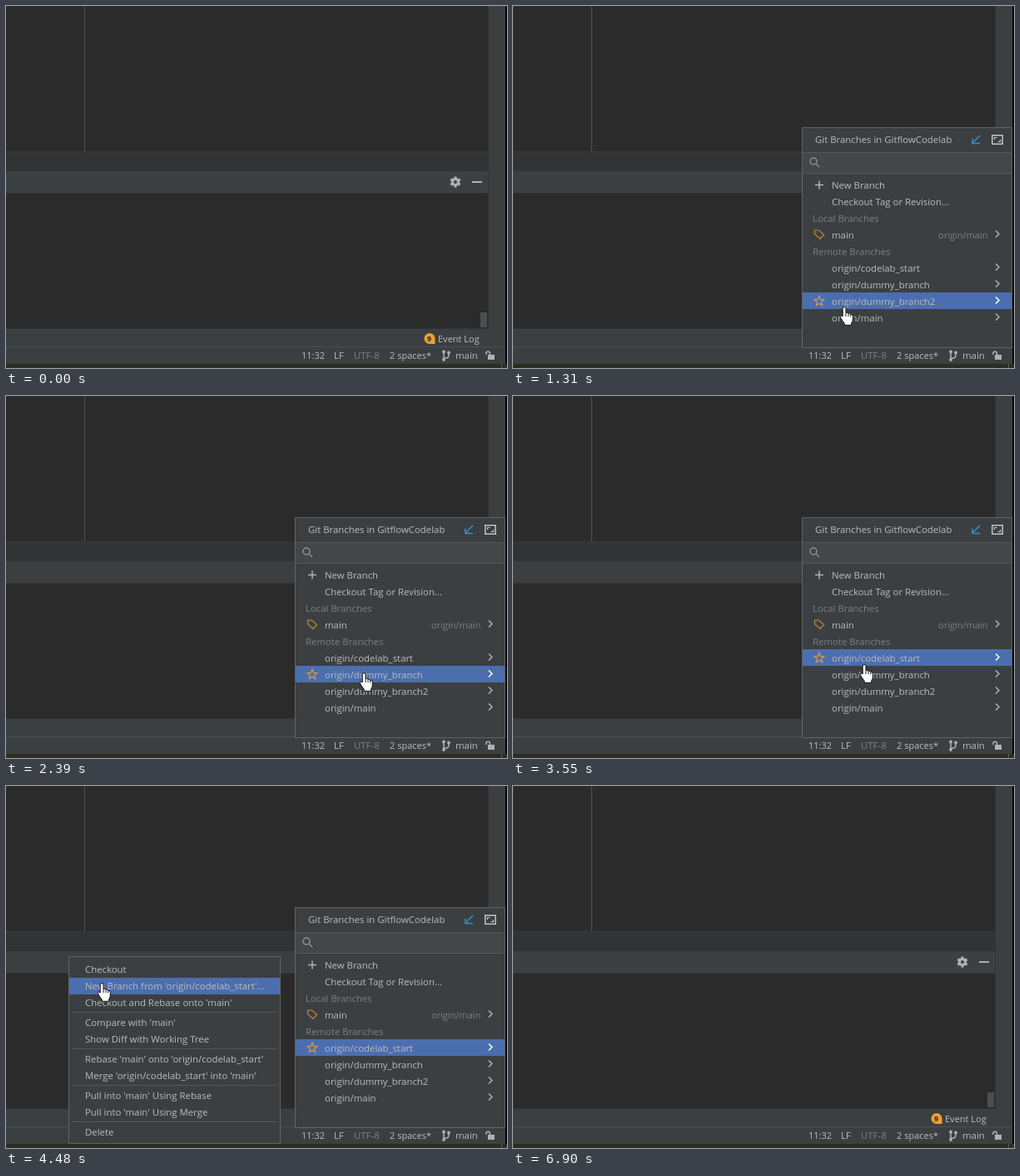
These frames come from a looping animation (602x436 px, 8 s). An HTML page:

```html
<!DOCTYPE html>
<html lang="en">
<head>
<meta charset="utf-8">
<title>Branch menu</title>
<style>
  html, body { margin: 0; width: 100%; height: 100%; overflow: hidden; background: #2b2b2b; }
  svg { display: block; }
  text { font-family: "Open Sans", "Noto Sans", sans-serif; font-size: 11.4px; fill: #bbb; white-space: pre; }
  rect { shape-rendering: crispEdges; }
  .small { font-size: 11px; }
  .dim { fill: #7d7f81; }
  .line { fill: none; stroke: #afb1b3; stroke-width: 1.5; }
</style>
</head>
<body>
<svg id="stage" width="602" height="436" viewBox="0 0 602 436"></svg>
<script>
(() => {
const LOOP = 8000;
const PANEL = '#3c3f41', EDGE = '#323232', SELECTED = '#4b6eaf', BORDER = '#616365';
const stage = document.getElementById('stage');

function add(parent, tag, attrs = {}, content = '') {
  const node = document.createElementNS('http://www.w3.org/2000/svg', tag);
  for (const key in attrs) node.setAttribute(key, attrs[key]);
  node.textContent = content;
  parent.appendChild(node);
  return node;
}
const group = parent => add(parent, 'g');
const rect = (parent, x, y, width, height, fill) => add(parent, 'rect', { x, y, width, height, fill });
const text = (parent, x, y, content, cls = '') => add(parent, 'text', { x, y, class: cls }, content);
const line = (parent, d, attrs = {}) => add(parent, 'path', { d, class: 'line', ...attrs });
const show = (node, on) => node.setAttribute('display', on ? 'inline' : 'none');
const tint = (node, color) => { node.style.stroke = color; };

function frame(parent, x, y, w, h) {
  rect(parent, x, y, w, h, BORDER);
  rect(parent, x + 1, y + 1, w - 2, h - 2, PANEL);
}

// Editor and tool window
rect(stage, 0, 0, 602, 436, '#2b2b2b');
rect(stage, 94, 0, 1, 175, '#505152');
rect(stage, 0, 175, 579, 1, '#38393a');
rect(stage, 0, 176, 579, 23, '#313335');
const header = rect(stage, 0, 199, 579, 26, PANEL);
rect(stage, 0, 225, 579, 1, EDGE);
rect(stage, 570, 369, 8, 18, '#4d4e4f');
rect(stage, 579, 0, 1, 389, EDGE);
rect(stage, 580, 0, 20, 389, PANEL);
rect(stage, 0, 388, 580, 1, EDGE);
rect(stage, 0, 389, 600, 42, PANEL);
rect(stage, 0, 410, 600, 1, '#4c4e50');
rect(stage, 600, 0, 2, 431, '#050505');
rect(stage, 0, 431, 602, 5, '#2d2d23');
rect(stage, 595, 431, 1, 5, '#62603f');

const gear = add(stage, 'g', { transform: 'translate(540 212)' });
for (let a = 0; a < 360; a += 60)
  add(gear, 'rect', { x: -1.6, y: -6.5, width: 3.2, height: 4, fill: '#afb1b3', transform: `rotate(${a})`, style: 'shape-rendering:auto' });
add(gear, 'circle', { r: 3.5, fill: 'none', stroke: '#afb1b3', 'stroke-width': 3 });
rect(stage, 560, 211, 12, 2, '#afb1b3');

// Status bar
add(stage, 'path', { d: 'M509 394a6.5 6.5 0 1 0 0 13h6.5v-6.5a6.5 6.5 0 0 0-6.5-6.5z', fill: '#eda12f' });
add(stage, 'text', { x: 506, y: 404, style: 'font-size:9px;font-weight:700;fill:#2b2b2b' }, '9');
text(stage, 519, 405, 'Event Log', 'small');
const hover = rect(stage, 516, 411, 55, 20, '#4c5052');
text(stage, 355, 425, '11:32', 'small');
text(stage, 394, 425, 'LF');
text(stage, 418, 425, 'UTF-8', 'dim');
text(stage, 461, 425, '2 spaces*', 'small');
text(stage, 540, 425, 'main');
line(stage, 'M526 416V427M526 424H529Q532 424 532 420V418');
for (const [cx, cy] of [[526, 416.5], [526, 426], [532, 417.5]])
  add(stage, 'circle', { cx, cy, r: 1.9, fill: '#afb1b3' });
rect(stage, 579, 420, 8, 6, '#afb1b3');
line(stage, 'M581.5 420V418.5a2.3 2.3 0 0 0-4.6 0V420');

// Branch popup
const popup = group(stage);
frame(popup, 347, 146, 253, 266);
rect(popup, 348, 176, 251, 1, '#55585a');
rect(popup, 348, 177, 251, 24, '#43474a');
rect(popup, 348, 201, 251, 1, '#55585a');
text(popup, 363, 165, 'Git Branches in GitflowCodelab');
line(popup, 'M561 156L552 165M552 159.5V165.5H558M556.5 165.5H561', { style: 'stroke:#3592c4' });
line(popup, 'M575.8 155.8h12.4v10.4h-12.4z', { style: 'stroke:#c0c2c4' });
line(popup, 'M578.5 161v-2.5h3M585.5 161v2.5h-3', { style: 'stroke:#c0c2c4;stroke-width:1.2' });
add(popup, 'circle', { cx: 361, cy: 187, r: 4, class: 'line', style: 'stroke:#8d9092' });
line(popup, 'M364 190L368 194', { style: 'stroke:#8d9092' });

const ROWS = ['New Branch', 'Checkout Tag or Revision...', null, 'main', null,
  'origin/codelab_start', 'origin/dummy_branch', 'origin/dummy_branch2', 'origin/main'];
const rowTop = i => 205 + 20 * i;
const rowBar = rect(popup, 348, 0, 251, 20, SELECTED);
const chevrons = [];
ROWS.forEach((label, i) => {
  if (!label) return;
  const y = rowTop(i) + 10.5;
  text(popup, 383, y + 4.5, label);
  if (i > 2) chevrons[i] = line(popup, `M580 ${y - 5}l4 4-4 4`);
});
line(popup, 'M368 210.5V220.5M363 215.5H373');
text(popup, 360, 260, 'Local Branches', 'dim');
text(popup, 360, 300, 'Remote Branches', 'dim');
text(popup, 511, 280, 'origin/main', 'small dim');
line(popup, 'M362.5 270h5l6 5.5-4.5 5-6.5-6zM365 272.2v.8', { style: 'stroke:#c0873c;stroke-width:1.2' });

const starPoints = Array.from({ length: 10 }, (_, k) => {
  const r = k % 2 ? 2.7 : 6.3, a = k * Math.PI / 5;
  return `${(r * Math.sin(a)).toFixed(2)},${(-r * Math.cos(a)).toFixed(2)}`;
}).join(' ');
const star = add(popup, 'polygon', { points: starPoints, class: 'line', style: 'stroke:#d69a42;stroke-width:1.2' });

// Submenu
const submenu = group(stage);
frame(submenu, 75, 205, 255, 226);
const actionBar = rect(submenu, 76, 0, 253, 20, SELECTED);
const ACTIONS = [
  ['Checkout', "New Branch from 'origin/codelab_start'...", "Checkout and Rebase onto 'main'"],
  ["Compare with 'main'", 'Show Diff with Working Tree'],
  ["Rebase 'main' onto 'origin/codelab_start'", "Merge 'origin/codelab_start' into 'main'"],
  ["Pull into 'main' Using Rebase", "Pull into 'main' Using Merge"],
  ['Delete']
];
const actionTops = [];
let nextTop = 211;
ACTIONS.forEach((section, i) => {
  if (i) {
    rect(submenu, 79, nextTop + 1, 247, 1, '#55585a');
    nextTop += 4;
  }
  for (const label of section) {
    text(submenu, 95, nextTop + 14, label);
    actionTops.push(nextTop);
    nextTop += 20;
  }
});

const tooltip = group(stage);
rect(tooltip, 114, 256, 267, 31, '#636569');
rect(tooltip, 115, 257, 265, 29, '#4b4d4d');
text(tooltip, 124, 276, "Checkout 'origin/codelab_start' as new branch");

// Pointers, each drawn around its hot spot
const arrow = add(stage, 'path', { d: 'M.5.5V16.5L4.2 13.2 6.7 19 9.2 18 6.7 12.2H11.8Z', fill: '#fff', stroke: '#111' });
const hand = group(stage);
add(hand, 'path', {
  d: 'M0 .5Q2 .5 2 2.5V7.5Q4.2 6.6 5 8.3 7 7.6 7.7 9.4 10.3 8.9 10.3 11.5V15Q10.3 18 8.7 19.8V22.3H.3V20.3Q-1.2 18.5-3.6 14.7-5.4 12-3.8 11-2.6 10.5-1.8 12V2.5Q-1.8.5 0 .5Z',
  fill: '#fff', stroke: '#111'
});
line(hand, 'M2 7.5V12M5 8.3V12M7.7 9.4V12.5', { style: 'stroke:#222;stroke-width:1' });
const busy = group(stage);
add(busy, 'circle', { r: 9.5, fill: 'none', stroke: '#2c7fb8', 'stroke-width': 4 });
add(busy, 'path', { d: 'M0-9.5A9.5 9.5 0 0 1 9.5 0', fill: 'none', stroke: '#9be0fa', 'stroke-width': 4 });

// Pointer moves: first step, last step, step count, end x, end y, optional bend
const MOVES = [
  [280, 360, 2, 540, 428],
  [510, 510, 1, 540, 427],
  [1220, 1310, 2, 398, 362],
  [1390, 1930, 8, 430, 232, 385, 290],
  [2080, 2390, 5, 430, 333],
  [2710, 2940, 4, 414, 311],
  [3320, 3320, 1, 422, 313],
  [3550, 3550, 1, 422, 323],
  [3870, 4330, 7, 116, 239, 200, 190],
  [4480, 4480, 1, 115, 237],
  [6820, 6820, 1, 30, 162]
];

function buildPath() {
  const path = [];
  let x0 = 548, y0 = 434;
  for (const [start, end, count, x, y, bx = (x0 + x) / 2, by = (y0 + y) / 2] of MOVES) {
    for (let k = 1; k <= count; k++) {
      const u = k / count, v = 1 - u;
      path.push({
        t: count > 1 ? start + (end - start) * (k - 1) / (count - 1) : start,
        x: Math.round(v * v * x0 + 2 * u * v * bx + u * u * x),
        y: Math.round(v * v * y0 + 2 * u * v * by + u * u * y)
      });
    }
    x0 = x;
    y0 = y;
  }
  return path;
}

// Remember which row each step leaves highlighted
const PATH = buildPath();
let row = -1, action = -1;
for (const p of PATH) {
  if (p.t >= 1220 && p.t < 3640 && p.x > 347) {
    const i = Math.floor((p.y - rowTop(0)) / 20);
    if (ROWS[i]) row = i;
  }
  if (p.t >= 3640 && p.x < 330) {
    const i = actionTops.findIndex(y => p.y >= y && p.y < y + 20);
    if (i >= 0) action = i;
  }
  p.row = row;
  p.action = action;
}

function render(t) {
  const within = (a, b) => t >= a && t < b;
  const p = PATH.filter(q => q.t <= t).pop() || { x: 0, y: 0, row: -1, action: -1 };

  header.setAttribute('fill', within(760, 5430) ? '#3c3e40' : '#3d4042');
  show(hover, within(280, 1070));
  show(popup, within(980, 5430));
  show(submenu, within(3640, 5430));
  show(tooltip, within(5030, 5180));

  show(rowBar, p.row >= 0);
  rowBar.setAttribute('y', rowTop(p.row));
  show(star, p.row >= 5);
  star.setAttribute('transform', `translate(368 ${rowTop(p.row) + 10.5})`);
  chevrons.forEach((c, i) => tint(c, i === p.row ? '#fff' : '#afb1b3'));
  show(actionBar, p.action >= 0);
  actionBar.setAttribute('y', actionTops[p.action] || 0);

  show(arrow, within(280, 1220) || within(5430, 6900));
  show(hand, within(1220, 5180));
  show(busy, within(5180, 5430));
  for (const node of [arrow, hand, busy]) node.setAttribute('transform', `translate(${p.x} ${p.y})`);
}

const began = performance.now();
function tick() {
  render((performance.now() - began) % LOOP);
  requestAnimationFrame(tick);
}
tick();
})();
</script>
</body>
</html>
```
